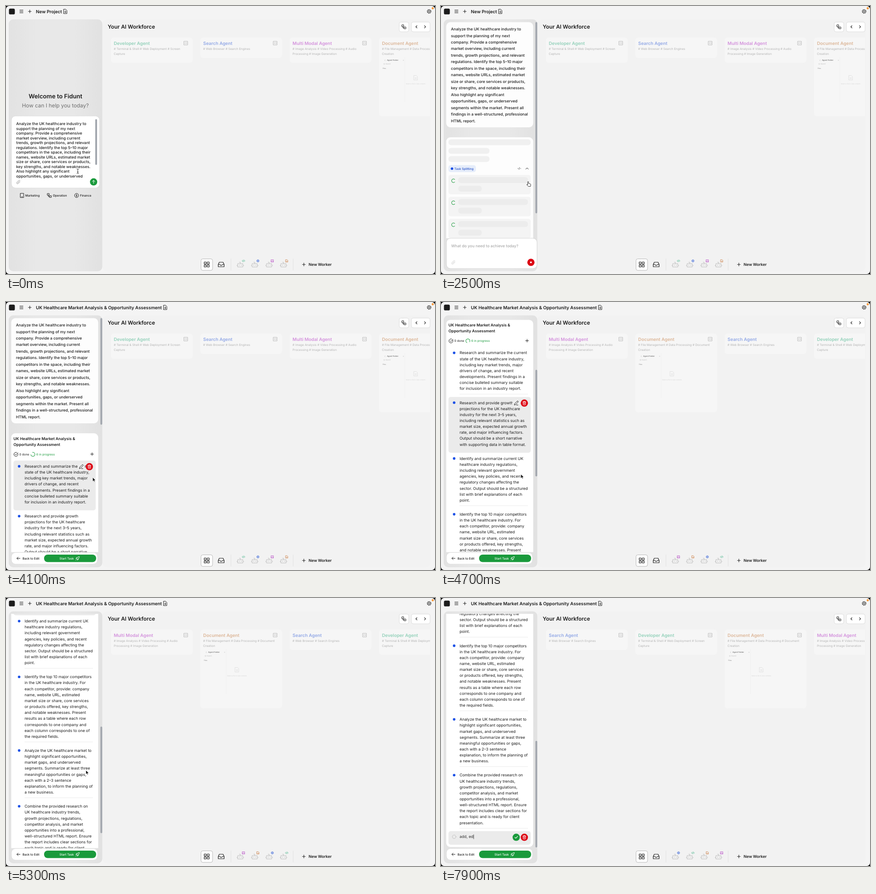
An HTML page for the animation above (8000 ms loop, 947x592 px).

```html
<!DOCTYPE html>
<html lang="en">
<head>
<meta charset="utf-8">
<title>AI Workforce</title>
<style>
html, body { margin: 0; width: 100%; height: 100%; overflow: hidden; background: #000; }
svg { display: block; width: 947px; height: 592px; }
text { font-family: Inter, "Liberation Sans", sans-serif; white-space: pre; text-rendering: geometricPrecision; }
</style>
</head>
<body>
<svg id="stage" viewBox="0 0 947 592" xmlns="http://www.w3.org/2000/svg"></svg>
<script>
(() => {
const LOOP = 8000;
const INK = '#1b1b1b', GREEN = '#1a9a3c', RED = '#dc0714', BLUE = '#1a50e6';
const BODY = 8.55, SMALL = 6.58;

// Drawing helpers; text is placed by the middle of its capitals.
const text = (x, y, size, str, fill = INK, weight = 400, more = '') =>
  `<text x="${x}" y="${(y + size * 0.355).toFixed(2)}" font-size="${size}" fill="${fill}" font-weight="${weight}" ${more}>${str.replace(/&/g, '&amp;')}</text>`;
const lines = (x, y, step, list, ...style) =>
  list.map((s, i) => text(x, y + i * step, style[0], s, style[1], style[2])).join('');
const box = (x, y, x2, y2, r, fill, more = '') =>
  `<rect x="${x}" y="${y}" width="${x2 - x}" height="${y2 - y}" rx="${r}" fill="${fill}" ${more}/>`;
const disc = (x, y, r, fill, more = '') => `<circle cx="${x}" cy="${y}" r="${r}" fill="${fill}" ${more}/>`;
const icon = (x, y, d, color = INK, w = 1, fill = 'none') =>
  `<path transform="translate(${x} ${y})" d="${d}" fill="${fill}" stroke="${color}" stroke-width="${w}" stroke-linecap="round" stroke-linejoin="round"/>`;
const group = (id, inner, more = '') => `<g id="${id}" ${more}>${inner}</g>`;
const clip = (id, x, y, x2, y2) => `<clipPath id="${id}">${box(x, y, x2, y2, 0, '#000')}</clipPath>`;
const edge = c => `stroke="${c}" stroke-width=".8"`;

const D = {
  plus: 'M-3.3 0H3.3M0-3.3V3.3',
  menu: 'M-3.7-3H3.7M-3.7 0H3.7M-3.7 3H3.7',
  save: 'M-3.5-4.8H.8L3.5-2.2V4.8H-3.5ZM0-1.8V2.5M-1.7 1L0 2.7 1.7 1',
  flow: 'M-4.3-4.3h3.8v3.8h-3.8ZM.5.5h3.8v3.8H.5ZM-2.4-.5V2.4H.5',
  clip: 'M3.5-.5L-.3 3.3a2.3 2.3 0 0 1-3.3-3.3L.6-4a1.5 1.5 0 0 1 2.2 2.2L-1.2 2.1a.7.7 0 0 1-1-1L1.2-2.2',
  up: 'M0 3.4V-3.4M-3-.5L0-3.4 3-.5',
  trash: 'M-3.5-2.5h7M-2.7-2.5V3a1 1 0 0 0 1 1h3.4a1 1 0 0 0 1-1V-2.5M-1.3-2.5V-4h2.6V-2.5M-.8-.5V2M.8-.5V2',
  pencil: 'M-4 4l.8-3L2-4.2a1.2 1.2 0 0 1 2 2L-1.2 3.2ZM.5 4.2H4',
  check: 'M-3 0L-1 2.2 3.2-2.2',
  rocket: 'M-2 0Q0-4 4-4Q4 0 0 2ZM-2 0L-4 .3-2-2H-.7M0 2L-.3 4 2 2V.7M-2 2L-4 4',
  grid: 'M-5.5-5.5h4.3v4.3h-4.3ZM1.2-5.5h4.3v4.3H1.2ZM-5.5 1.2h4.3v4.3h-4.3ZM1.2 1.2h4.3v4.3H1.2Z',
  tray: 'M-6.5 0L-4.2-5H4.2L6.5 0V5H-6.5ZM-6.5 0H-2.5L-1.2 2H1.2L2.5 0H6.5',
  robot: 'M-5.5-2h11v7.5h-11ZM0-2V-5H-2.2M-7.3 1.5V3M7.3 1.5V3M-2.2 1V2.3M2.2 1V2.3',
  code: 'M-4-4h8v8h-8ZM-1-1.5L-2.4 0-1 1.5M1-1.5L2.4 0 1 1.5',
  page: 'M-4-5H1.5L4-2.5V5H-4ZM-1.8 0H1.8M-1.8 2.2H1.8'
};

// The prompt, broken into lines by word counts.
const prompt = counts => {
  const words = ('Analyze the UK healthcare industry to support the planning of my next company. Provide a comprehensive ' +
    'market overview, including current trends, growth projections, and relevant regulations. Identify the top 5–10 major ' +
    'competitors in the space, including their names, website URLs, estimated market size or share, core services or products, ' +
    'key strengths, and notable weaknesses. Also highlight any significant opportunities, gaps, or underserved segments within ' +
    'the market. Present all findings in a well-structured, professional HTML report.').split(' ');
  return counts.map(n => words.splice(0, n).join(' '));
};
const narrow = prompt([6, 6, 4, 4, 5, 6, 6, 5, 7, 5, 4, 4, 6, 5, 2]);
const wide = prompt([6, 7, 4, 5, 4, 7, 6, 7, 6, 5, 4, 5, 6, 3]);

const tasks = [
  ['Research and summarize the current', 'state of the UK healthcare industry,', 'including key market trends, major',
   'drivers of change, and recent', 'developments. Present findings in a', 'concise bulleted summary suitable',
   'for inclusion in an industry report.'],
  ['Research and provide growth', 'projections for the UK healthcare', 'industry for the next 3–5 years,',
   'including relevant statistics such as', 'market size, expected annual growth', 'rate, and major influencing factors.',
   'Output should be a short narrative', 'with supporting data in table format.'],
  ['Identify and summarize current UK', 'healthcare industry regulations,', 'including relevant government',
   'agencies, key policies, and recent', 'regulatory changes affecting the', 'sector. Output should be a structured',
   'list with brief explanations of each', 'point.'],
  ['Identify the top 10 major competitors', 'in the UK healthcare industry. For', 'each competitor, provide: company',
   'name, website URL, estimated', 'market size or share, core services', 'or products offered, key strengths,',
   'and notable weaknesses. Present', 'results as a table where each row', 'corresponds to one company and',
   'each column corresponds to one of', 'the required fields.'],
  ['Analyze the UK healthcare market to', 'highlight significant opportunities,', 'market gaps, and underserved',
   'segments. Summarize at least three', 'meaningful opportunities or gaps,', 'each with a 2–3 sentence',
   'explanation, to inform the planning of', 'a new business.'],
  ['Combine the provided research on', 'UK healthcare industry trends,', 'growth projections, regulations,',
   'competitor analysis, and market', 'opportunities into a professional,', 'well-structured HTML report. Ensure',
   'the report includes clear sections for', 'each topic and is ready for client', 'presentation.']
];
const LH = 13.152;
const rows = [];
let addY = 350.2;
for (const t of tasks) {
  const h = t.length * LH + 18;
  rows.push({ y: addY, h });
  addY += h;
}
rows.push({ y: addY, h: 30 });

const agents = [
  { name: 'Developer Agent', color: '#93d1ba', about: ['# Terminal & Shell # Web Deployment # Screen', 'Capture'],
    badge: icon(7, -8, 'M-1.5-1.8L-3.2 0-1.5 1.8M1.5-1.8L3.2 0 1.5 1.8M.5-2L-.5 2', '#5dbd98', .9) },
  { name: 'Search Agent', color: '#93a9e6', about: ['# Web Browser # Search Engines'],
    badge: icon(7, -8, 'M-2.6 0a2.6 2.6 0 1 0 5.2 0a2.6 2.6 0 1 0-5.2 0M-2.6 0H2.6M0-2.6V2.6', '#5f82dd', .9) },
  { name: 'Multi Modal Agent', color: '#d391dc', about: ['# Image Analysis # Video Processing # Audio', 'Processing # Image Generation'],
    badge: icon(7, -8, 'M-2.5-2.5h5v5h-5ZM-2.5 1.5L0-.5 2.5 2', '#bd5cca', .9) },
  { name: 'Document Agent', color: '#dcb698', about: ['# File Management # Data Processing # Document', 'Creation'],
    badge: icon(7, -8, 'M-2.2-2.6H1L2.4-1.2V2.6H-2.2ZM-1 .8H1.2', '#d08a55', .9), preview: true }
];
const preview =
  icon(13.5, 120, 'M.8-1.2L-.6 0 .8 1.2', '#aaa', .5) + text(18, 120, 4.1, 'Agent Folder', '#777', 600) +
  text(53, 120, 4, '×', '#aaa') + disc(12, 128, 1.2, 'none', 'stroke="#bbb" stroke-width=".5"') +
  text(15, 128, 3.4, 'Search', '#b5b5b5') + text(8.5, 138, 3.4, 'Files', '#8c8c8c', 500) +
  box(57.5, 113, 58, 212, 0, '#ebebeb') + icon(81.5, 158.5, D.page, '#dcdcdc', .8) +
  text(81.5, 172, 3.2, 'Select a file to view contents', '#cfcfcf', 400, 'text-anchor="middle"');
const card = a =>
  box(0, 69, 181.5, a.preview ? 244.5 : a.about[1] ? 126 : 115.5, 7, '#f6f6f6', 'stroke="#f0f0f0" stroke-width=".6"') +
  text(7, 82, 9.86, a.name, a.color, 600) + icon(166, 82, D.code, '#b4b4b4', .9) +
  lines(7, 95, 10.5, a.about, SMALL, '#b3b3b3') + (a.preview ? preview : '');

const ring = (x, y, r) => `<g transform="translate(${x} ${y})"><path class="spin" d="M${r * .78} ${-r * .62}A${r} ${r} 0 1 0 ${r * .78} ${r * .62}" fill="none" stroke="${GREEN}" stroke-width="1"/></g>`;
const bubble = (x2, y2) => box(11.5, 35.8, x2, y2, 9, '#fdfdfd');
const thumb = (id, x, y, y2) => box(x, y, x + 4, y2, 2, '#a2a7ae', `id="${id}"`);

const frameUI =
  box(0, 0, 947, 592, 7, '#f4f4f4') + box(213, 30, 937, 586, 10, '#f2f2f2') +
  box(6.5, 5.8, 19.5, 18.6, 3.2, '#1c1c1c') + icon(34, 12, D.menu) + icon(52.5, 12, D.plus) +
  text(66, 12, 9.86, '', INK, 600, 'id="title"') + group('save', icon(0, 12, D.save)) +
  disc(934, 12, 1.5, 'none', edge(INK)) + disc(934, 12, 3.5, 'none', edge(INK)) +
  disc(934, 12, 4.3, 'none', `stroke="${INK}" stroke-width="1.2" stroke-dasharray="1.5 1.877"`) +
  disc(942, 5, 2.4, '#f79a3c') +
  box(6, 29.5, 212.5, 586, 10, 'url(#side)') +
  text(224.5, 46, 11.84, 'Your AI Workforce', INK, 600) +
  box(868, 35.5, 889, 57, 4, '#fff', edge('#d6d6d6')) + icon(878.5, 46, D.flow) +
  box(895, 35.5, 936, 57, 4, '#fff', edge('#d6d6d6')) +
  icon(906, 46, 'M1.3-2.6L-1.3 0 1.3 2.6', INK, 1.1) + icon(925, 46, 'M-1.3-2.6L1.3 0-1.3 2.6', INK, 1.1) +
  `<g clip-path="url(#cards)">${agents.map((a, i) => group('card' + i, card(a))).join('')}</g>` +
  box(430.5, 558.5, 456, 584, 4, '#fff', edge('#a8a8a8')) + icon(443, 571, D.grid, INK, 1.2) + icon(475, 571, D.tray, INK, 1.2) +
  box(496, 558, 497, 584, 0, '#e2e2e2') + box(633.5, 558, 634.5, 584, 0, '#e2e2e2') +
  agents.map((a, i) => group('bot' + i, icon(0, 0, D.robot, '#b9b9b9', .9) + a.badge)).join('') +
  icon(657.5, 571, D.plus) + text(668, 571, BODY, 'New Worker', INK, 600);

const welcome =
  text(109.2, 199.5, 13.15, 'Welcome to Fidunt', INK, 600, 'text-anchor="middle"') +
  text(109, 219.5, 11.84, 'How can I help you today?', '#6e6e6e', 400, 'text-anchor="middle"') +
  box(12, 243, 206.5, 402, 9, '#fff', edge('#d9d9d9')) +
  lines(22.5, 260, 10.53, narrow.slice(0, 12), BODY, INK, 500) +
  thumb('draftBar', 197, 250, 351) + icon(27.5, 389, D.clip, '#9c9c9c', .8) +
  disc(193.4, 388.6, 8, GREEN) + icon(193.4, 388.6, D.up, '#fff') +
  icon(35.5, 418.5, 'M-3.6-4.6h7.2v9.2h-7.2ZM-1 2.9H1') + text(42.5, 418.5, SMALL, 'Marketing', INK, 500) +
  icon(95.8, 418.5, D.flow) + text(103.5, 418.5, SMALL, 'Operation', INK, 500) +
  disc(155.8, 418.5, 4.5, 'none', `stroke="${INK}"`) +
  text(155.8, 418.5, 6.4, '$', INK, 600, 'text-anchor="middle"') + text(163.5, 418.5, SMALL, 'Finance', INK, 500);

const sent = bubble(207, 254) + lines(22, 51, 14.467, wide, BODY, INK, 500);

const bone = (x, y, x2, c = '#f0f0f0') => box(x, y, x2, y + 13, 6, c);
const skeleton = [0, 1, 2].map(i => {
  const y = 373 + i * 48.6;
  return box(16.5, y, 198, y + 43, 5, '#f4f4f4') + ring(27.5, y + 13, 4) +
    bone(38, y + 5, 192, '#ececec') + bone(38, y + 24, 90, '#ececec');
}).join('');
const longBubble = bubble(203.5, 268) + lines(22, 51, 14.467, narrow, BODY, INK, 500);
const split = `<g clip-path="url(#short)">${longBubble}` +
  group('bones', box(11.5, 290, 203.5, 540, 9, '#fdfdfd') + bone(16.5, 294.5, 198) + bone(16.5, 313.5, 107) + bone(16.5, 331.5, 107) +
    box(16.5, 351.5, 77, 367, 5, '#e6edfa') + disc(24.3, 359.3, 2.8, BLUE) + text(29.5, 359.3, SMALL, 'Task Splitting', '#2450c8', 500) +
    text(168.5, 359, SMALL, '-/-', INK, 500) + icon(190, 359, 'M-2.8 1.4L0-1.4 2.8 1.4') + skeleton) +
  '</g>' + thumb('halfBar', 208.4, 35.5, 458);

const composer =
  box(12, 513, 212, 580, 9, '#fff', edge('#cfcfcf')) +
  text(22.5, 530, BODY, 'What do you need to achieve today?', '#a9a9a9', 500) +
  icon(27.5, 566.5, D.clip, '#cfcfcf', .8) + disc(198.5, 566.3, 8, RED) + box(196.7, 564.5, 200.3, 568.1, 1, '#fff');

const plan = `<g clip-path="url(#view)"><g id="list">${longBubble}` +
  box(11.5, 290, 203.5, addY + 35, 9, '#fff') +
  lines(16.5, 301.5, 13, ['UK Healthcare Market Analysis &', 'Opportunity Assessment'], BODY, INK, 600) +
  icon(22, 336.5, 'M4.2-1.6A4.5 4.5 0 1 1 1.6-4.2M-2-.2L-.2 1.6 4.4-3.6') + text(29.5, 336.5, SMALL, '0 done', INK) +
  ring(59.3, 336.5, 4.5) + text(67, 336.5, SMALL, '6 in progress', GREEN) + icon(190, 336, D.plus) +
  rows.slice(0, 6).map(r => box(41, r.y + r.h - 6.6, 192, r.y + r.h - 5.8, 0, '#e6e6e6')).join('') +
  box(16.5, 0, 198, 1, 5, '#ebebeb', 'id="hover"') +
  tasks.map((t, i) => disc(29, rows[i].y + 12.7, 2.8, BLUE) + lines(41, rows[i].y + 12.8, LH, t, BODY, INK)).join('') +
  disc(29, addY + 12.5, 3.9, 'none', 'id="dot" stroke="#8b8b8b" stroke-width=".8"') +
  text(41, addY + 12.3, BODY, 'Add new task', '#8a8a8a', 400, 'id="entry"') + box(0, addY + 7.5, .8, addY + 17.5, 0, INK, 'id="caret"') +
  group('tools', group('edit', disc(166, 0, 8, '#efefef') + icon(166, 0, D.pencil)) +
    group('done', disc(166, 0, 8, GREEN) + icon(166, 0, D.check, '#fff', 1.1)) +
    disc(184, 0, 8, RED) + icon(184, 0, D.trash, '#fff', .9)) +
  '</g></g>' + thumb('bar', 208.4, 35.5, 271) +
  box(12, 553.5, 202, 579, 9, '#fff', edge('#dcdcdc')) + icon(27.5, 566.3, 'M3.5 0H-3.5M-.6-3L-3.5 0-.6 3') +
  text(36.5, 566.3, SMALL, 'Back to Edit', INK, 500) + box(84, 558, 199, 574.5, 8, GREEN) +
  text(118, 566.3, SMALL, 'Start Task', '#fff', 500) + icon(158, 566.3, D.rocket, '#fff', .9);

const pointers =
  group('arrow', icon(0, 0, 'M0 0V9L2.1 7L3.6 10.2L5 9.6L3.6 6.5H6.3Z', '#fff', .7, '#111')) +
  group('hand', icon(-1, 0, 'M1 1.2a1 1 0 0 1 2 0V4.5l3 .6q2 .4 1.8 2.4l-.5 3.5H2.5L-.8 7.5q-.3-1.5 1-1L1 7.2Z', '#222', .9, '#fff')) +
  group('beam', icon(0, 0, 'M-2-5q2 0 2 1v8q0 1-2 1M2-5q-2 0-2 1M2 5q-2 0-2-1M-1 1.6H1', '#222', .9));

document.getElementById('stage').innerHTML =
  `<defs>${clip('cards', 213, 60, 936, 260)}${clip('short', 11, 35, 204, 513)}${clip('view', 11, 35, 204, 552.5)}` +
  '<linearGradient id="side"><stop offset="0" stop-color="#e2e2e2"/><stop offset=".3" stop-color="#e8e8e8"/>' +
  '<stop offset=".7" stop-color="#e8e8e8"/><stop offset="1" stop-color="#e1e1e1"/></linearGradient></defs>' +
  frameUI + group('welcome', welcome) + group('sent', sent) + group('split', split) +
  group('composer', composer) + group('plan', plan) + pointers;

// Timeline: each row is [ms, value...].
const SEND = 1100, SPLIT = 2000, PLAN = 3000, EDIT = 6400;
const pathKeys = [[250, 158.5, 365], [850, 192, 386], [1000, 192, 386], [1200, 191.3, 387.5], [4250, 191.3, 387.5],
  [4700, 176.3, 380.5], [5450, 176.3, 380.5], [6100, 72.5, 519.5]];
const scrollKeys = [[4200, 0], [4400, 60], [4700, 250], [5000, 412.5], [5300, 545], [5600, 610], [5750, 616.5],
  [EDIT - 50, 616.5], [EDIT + 50, 614]];
const hoverKeys = [[0, 0], [4600, 1], [5450, 3], [5700, 5], [6000, 6]];
const orderKeys = [[0, [0, 1, 2, 3]], [4500, [2, 3, 1, 0]], [5400, [1, 0, 3, 2]]];
const pointerKeys = [[0, 'beam'], [750, 'hand'], [SEND, 'arrow'], [SPLIT, 'hand'], [PLAN, 'arrow'], [6700, '']];
const typeKeys = [6800, 6960, 7120, 7300, 7450, 7650, 7850];

const hold = (keys, t) => keys.filter(k => k[0] <= t).pop()[1];
const smooth = p => p * p * (3 - 2 * p);
const glide = (keys, t, ease = p => p) => {
  const i = keys.findIndex(k => k[0] > t);
  if (i < 0) return keys[keys.length - 1].slice(1);
  if (i === 0) return keys[0].slice(1);
  const a = keys[i - 1], b = keys[i], p = ease((t - a[0]) / (b[0] - a[0]));
  return a.slice(1).map((v, j) => v + (b[j + 1] - v) * p);
};
const $ = id => document.getElementById(id);
const show = (id, on) => { $(id).style.display = on ? '' : 'none'; };
const move = (id, x, y) => $(id).setAttribute('transform', `translate(${x} ${y})`);
const spinners = document.querySelectorAll('.spin');

function draw(t) {
  show('welcome', t < SEND);
  show('sent', t >= SEND && t < SPLIT);
  show('split', t >= SPLIT && t < PLAN);
  show('composer', t >= SEND && t < PLAN);
  show('plan', t >= PLAN);

  $('title').textContent = t < PLAN ? 'New Project' : 'UK Healthcare Market Analysis & Opportunity Assessment';
  move('save', 66 + $('title').getComputedTextLength() + 7.4, 0);
  $('bones').style.opacity = Math.min(1, .3 + Math.max(0, t - SPLIT) / 300);

  // The spinners stall while the plan is being prepared.
  const spinT = t >= 2600 && t < PLAN ? (t < 2800 ? 2600 : 2800) : t;
  spinners.forEach(s => s.setAttribute('transform', `rotate(${(spinT - 2500) * .36})`));

  hold(orderKeys, t).forEach((a, slot) => {
    move('card' + a, 231 + slot * 197.3, 0);
    move('bot' + a, 517.3 + slot * 31.8, 571);
  });

  const [scroll] = glide(scrollKeys, t);
  move('list', 0, -scroll);
  move('bar', 0, scroll * .456);

  const editing = t >= EDIT, row = rows[hold(hoverKeys, t)];
  $('hover').setAttribute('y', row.y);
  $('hover').setAttribute('height', row.h);
  move('tools', 0, row.y + 13.6);
  show('edit', !editing);
  show('done', editing);

  const entry = $('entry');
  const count = typeKeys.filter(k => k <= t).length;
  const blank = !editing || !count;
  entry.textContent = blank ? 'Add new task' : 'add, ed'.slice(0, count);
  entry.setAttribute('fill', blank ? '#8a8a8a' : '#333');
  $('dot').setAttribute('stroke-dasharray', editing ? '1.6 1.2' : 'none');
  $('caret').setAttribute('x', 41.3 + (blank ? 0 : entry.getComputedTextLength()));
  show('caret', editing);

  const [x, y] = glide(pathKeys, t, smooth), kind = hold(pointerKeys, t);
  for (const id of ['arrow', 'hand', 'beam']) {
    show(id, id === kind);
    move(id, x, y);
  }
}

const start = performance.now();
function tick() {
  draw((performance.now() - start) % LOOP);
  requestAnimationFrame(tick);
}
tick();
})();
</script>
</body>
</html>
```
